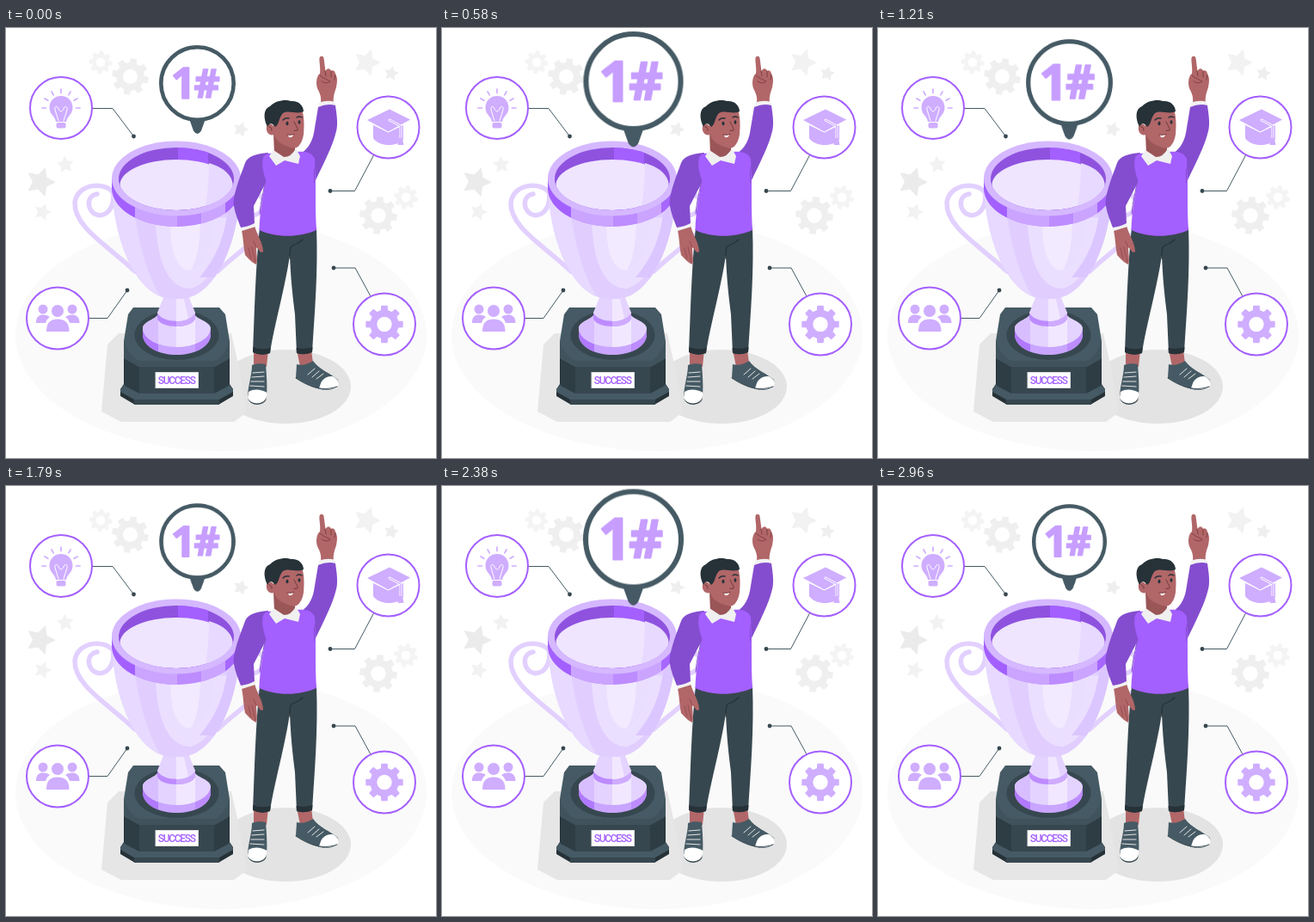
An HTML page for the animation above (3 s loop, 500 by 500 pixels).

```html
<!DOCTYPE html>
<html lang="en">
<head>
<meta charset="utf-8">
<title>Success</title>
<style>
html, body { margin: 0; width: 100%; height: 100%; overflow: hidden; background: #fff; }
svg { display: block; width: 100vw; height: 100vh; }
#bubble { transform-origin: 222.5px 72.5px; }
.link { fill: none; stroke: #455a64; stroke-width: 1; }
.ring { fill: #fff; stroke: #a45fff; stroke-width: 2; }
.line { fill: none; stroke-linecap: round; stroke-linejoin: round; }
</style>
</head>
<body>
<svg viewBox="0 0 500 500" xmlns="http://www.w3.org/2000/svg">
  <defs>
    <clipPath id="cup"><path d="M123 178C124 245 150 310 190 315H206C246 310 272 245 273 178Z"/></clipPath>
    <clipPath id="band"><path d="M123 175V186A75 45 0 0 0 273 186V175Z"/></clipPath>
    <clipPath id="hole"><ellipse cx="198" cy="175.500" rx="67" ry="36.500"/></clipPath>
    <clipPath id="dome"><path d="M159 350C160 341 174 339 177 333H219C222 339 237 341 238 350V358C236 372 218 380 198.500 380C179 380 161 372 159 358Z"/></clipPath>
    <clipPath id="domeTop"><path d="M159 349C160 341 174 339 177 333H219C222 339 237 341 238 349A39.500 22 0 0 1 159 349Z"/></clipPath>
    <path id="handle" class="line" stroke="#e2d0ff" stroke-width="5.500" d="M125 192C116 178 83 180 80 203C79 232 120 254 150 283M124 189C128 207 118 219 107 217.500C94 215 92 195 106 193"/>
  </defs>

  <!-- floor and shadows -->
  <ellipse cx="250" cy="357" rx="239" ry="135" fill="#fafafa"/>
  <ellipse cx="325" cy="417" rx="76" ry="43" fill="#e3e3e3"/>
  <path d="M111 446L118 368 131 355H262L272 400 280 447 265 458H134Z" fill="#e6e6e6"/>
  <g id="decor"></g>

  <!-- connected icons -->
  <g class="link">
    <path d="M100 93.500H124L148.500 126M96 337.500H118L141 305M428 147L405.500 189.500H377M424 312L406 279H381"/>
  </g>
  <g fill="#37474f">
    <circle cx="148.500" cy="126" r="2.400"/><circle cx="141" cy="305" r="2.400"/>
    <circle cx="377" cy="189.500" r="2.400"/><circle cx="381" cy="279" r="2.400"/>
  </g>
  <g class="ring">
    <circle cx="64" cy="93" r="36"/><circle cx="60" cy="337.500" r="36"/>
    <circle cx="444.500" cy="115.500" r="36"/><circle cx="440" cy="344.500" r="36"/>
  </g>
  <g id="icons" fill="#cfadff">
    <path d="M64 79C72 79 77.500 85 77.500 92.500C77.500 101 71 102 70 109H58C57 102 50.500 101 50.500 92.500C50.500 85 56 79 64 79Z"/>
    <rect x="58.500" y="110" width="11" height="6.500" rx="2"/>
    <path class="line" stroke="#fff" stroke-width="1" d="M61 108L57 95C56 91 60 90 61 94C63 98 65 98 67 94C68 90 72 91 71 95L67 108"/>
    <g id="rays" class="line" stroke="#cfadff" stroke-width="1.700"></g>

    <circle cx="43" cy="327" r="5.500"/><circle cx="77" cy="327" r="5.500"/>
    <path d="M35 343C35 336 38 333.500 43 333.500C47 333.500 49 334.500 51 336C48 338 47 340 46 343ZM85.500 343C85.500 336 82 333.500 77 333.500C73 333.500 71 334.500 69 336C72 338 73 340 74 343Z"/>
    <path d="M47 353C47 342 52 338.500 60 338.500C68 338.500 73.500 342 73.500 353Z"/>
    <circle cx="60" cy="329" r="7.500" stroke="#fff" stroke-width="1"/>

    <path d="M427 113L444.500 121.500 462 113V129C457 138 434 139 427 128Z"/>
    <path d="M419 107L446 94 471 106.500 444.500 121Z" stroke="#fff" stroke-width="1"/>
    <path class="line" stroke="#fff" stroke-width="3" d="M446 107L459 114V130"/>
    <path class="line" stroke="#cfadff" stroke-width="1.400" d="M446 107L459 114V130"/>
    <path d="M457 128H461L462.500 136H455.500Z"/>
  </g>

  <!-- pedestal -->
  <path d="M137 383L137 414 133 420V428L150 438H247L264 428V420L260 414V383Z" fill="#263238"/>
  <path d="M133 420L138 414 155 423H242L259 414 264 420V423L248 432H149L133 423Z" fill="#455a64"/>
  <path d="M149 432H248V438H149Z" fill="#37474f"/>
  <path d="M138 365L155 392V425L138 416ZM259 365L242 392V425L259 416Z" fill="#2e3d44"/>
  <path d="M155 390H242V425H155Z" fill="#37474f"/>
  <path d="M142 333L148 325H248L255 333 260 364V384L243 394H155L137 384V364Z" fill="#455a64"/>
  <path d="M137 364V384L155 394H243L260 384V364C255 380 246 387 240 387H158C150 387 142 378 137 364Z" fill="#40535c"/>
  <ellipse cx="198.500" cy="357" rx="49" ry="29" fill="#37474f"/>
  <rect x="174" y="400.500" width="49.500" height="18" fill="#fff" stroke="#e0e0e0"/>
  <text x="198.300" y="413.600" text-anchor="middle" font-family="Roboto, 'Liberation Sans', sans-serif" font-weight="500" font-size="12" letter-spacing="-1.300" fill="#a45fff">SUCCESS</text>

  <!-- trophy -->
  <use href="#handle"/>
  <use href="#handle" transform="matrix(-1 0 0 1 396 0)"/>
  <g clip-path="url(#dome)">
    <path d="M150 320H250V390H150Z" fill="#c9a5ff"/>
    <path d="M150 350V390H177V350Z" fill="#b079ff"/>
    <path d="M220 350V390H250V350Z" fill="#bd8cff"/>
  </g>
  <g clip-path="url(#domeTop)">
    <path d="M150 320H250V390H150Z" fill="#e4d3ff"/>
    <path d="M150 330H177V390H150Z" fill="#d8beff"/>
    <path d="M198 330H220V390H198Z" fill="#f1e8ff"/>
  </g>
  <path d="M176 330V338C180 350 216 350 220 338V330Z" fill="#bd8bff"/>
  <path d="M198 330V347C209 347 217 344 220 338V330Z" fill="#cfabff"/>
  <path d="M184 311H212L220 331C214 344 182 344 176 331Z" fill="#e4d3ff"/>
  <path d="M198 311H206L212 338C208 340 203 341 198 341Z" fill="#f1e8ff"/>
  <g clip-path="url(#cup)">
    <path d="M120 170H276V320H120Z" fill="#e1ceff"/>
    <path d="M120 180H146C150 235 160 280 181 315H120Z" fill="#e7d9ff"/>
    <path d="M174 224C176 275 190 303 215 303C242 294 255 260 260 220Z" fill="#ebdfff"/>
    <path d="M191 226C191 262 199 282 215 282C233 279 241 250 243 216Z" fill="#f2eaff"/>
    <path d="M226 220H243C241 250 233 279 215 282C222 270 226 250 226 220Z" fill="#eadeff"/>
    <path d="M258 210H275V290H225C244 268 254 244 258 210Z" fill="#dcc6ff"/>
  </g>
  <g clip-path="url(#band)">
    <path d="M120 170H276V235H120Z" fill="#bd8cff"/>
    <path d="M120 170H150V235H120Z" fill="#a360ff"/>
    <path d="M150 170H199V235H150Z" fill="#cba4ff"/>
    <path d="M227 170H255V235H227Z" fill="#cba4ff"/>
    <path d="M255 170H276V235H255Z" fill="#a767ff"/>
  </g>
  <ellipse cx="198" cy="175" rx="75" ry="43.500" fill="#d5b8ff"/>
  <g clip-path="url(#hole)">
    <path d="M130 135H268V215H130Z" fill="#8f52df"/>
    <path d="M200 135H235V215H200Z" fill="#a45fff"/>
    <ellipse cx="198" cy="182.500" rx="65.500" ry="29.500" fill="#efe5ff"/>
    <path d="M236 157C256 163 264 173 263.500 184C261 195 250 203 232 207C235 190 236 172 236 157Z" fill="#e7d9ff"/>
  </g>

  <!-- man -->
  <path d="M288 374H305L303 394H288ZM338 374H355L357 390 342 394Z" fill="#b16668"/>
  <path d="M286 392C291 390 297 390 302 391C303 403 304 418 303 428C301 439 284 440 281 430C281 417 286 404 286 392Z" fill="#455a64"/>
  <path d="M282 423C288 419 297 420 303.500 424C304 440 281 442 281 430Z" fill="#fff"/>
  <path d="M281 430C284 438 299 439 303 430C302 440 283 441 281 430Z" fill="#37474f"/>
  <path d="M338 391C344 393 351 391 357 387C364 397 378 402 386 409C389 419 376 423 365 420C354 417 345 412 337 407Z" fill="#455a64"/>
  <path d="M366 413C369 407 375 404 381 405.500C386 409 388 412 386 416C380 421 371 421 364 419Z" fill="#fff"/>
  <path class="line" stroke="#37474f" stroke-width="1" d="M337 407C349 415 366 424 385 417"/>
  <path class="line" stroke="#e6e6e6" stroke-width="1" d="M287 401L300 400M286 406L300 405M285 411L300 411M284 416L300 417M351 403L359 396M356 406L364 399M361 408L369 402"/>
  <path d="M295 232C310 238 342 240 361 232C363 282 359 330 356 377Q347 381 338 378L336 333C333 310 331 290 330 264C325 300 312 345 307 378Q297 382 287 377C289 330 290 280 295 232Z" fill="#37474f"/>
  <path d="M287.300 371Q298 375 307.700 372L307 378Q297 382 287 377ZM337.500 372Q347 374 356.500 371L356 377Q347 381 338 378Z" fill="#263238"/>
  <path class="line" stroke="#263238" stroke-width="1.200" d="M345 246C339 252 333 252 331 255C330 259 330 262 330 268"/>

  <path d="M366 88C367 80 365 76 362 70C360 64 361 56 365 53C366 46 364 40 364.500 35C365 32 369 32 369.500 35L371.500 50C374 46 377 47 378 50C381 48 383 51 383 54C386 57 385 64 384 69C382 75 380 80 381 89Z" fill="#b16668"/>
  <path class="line" stroke="#74383a" stroke-width=".8" d="M371 50L372 56M378 50V57M383 54L382 60M365 55C369 59 374 60 377 62C374 65 370 64 367 62"/>
  <path d="M363.500 87Q374 83 382.500 86L383 92 363 94Z" fill="#f2f2f2"/>
  <path d="M363 92Q374 87 383 90C385 103 386 113 384 120C380 137 370 156 360 177L338 149C350 143 356 133 358 122Z" fill="#844dcf"/>

  <path d="M274 235L289 230C292 241 299 250 299 260C296 263 294 257 291 255C291 263 293 270 291 275C286 273 282 268 278 264C276 255 276 244 274 235Z" fill="#b16668"/>
  <path class="line" stroke="#8e484b" stroke-width=".8" d="M286 255L290 272M282 256L285 268M291 255L288 248"/>
  <path d="M273 230L288 225 290 231 274 236Z" fill="#f2f2f2"/>
  <path d="M305 145C291 146 281 149 278 157C273 171 265 190 264.500 204C266 215 270 224 273 232Q282 231 289 227L288 207 304 176Z" fill="#844dcf"/>
  <path d="M299 151C300 146 307 145 313 146L325 153 338 144C348 143 356 145 359 152C361 180 359 208 361 235C341 244 313 244 294.500 235C295 212 300 190 302 177C299 167 297 159 299 151Z" fill="#a45fff"/>
  <path class="line" stroke="#844dcf" stroke-width="1" d="M302 177C300 188 296 202 295 216M359 180C358 172 358 165 360 160"/>
  <path d="M311 122L312 147Q323 160 336 148L336 132Z" fill="#9a5557"/>
  <path d="M311 142L306 149 314 160 324 154 340 158 342 149 337 140Q332 150 323 150Z" fill="#f0f0f0"/>
  <path d="M312 97L343 92C347 102 347 112 346 124C344 136 338 142 331 139C321 136 314 132 312 124C305 126 302 120 303 115C304 110 309 111 311 114Z" fill="#b16668"/>
  <path d="M304 115C299 105 299 94 307 91C314 84 325 83 331 85C340 84 346 90 346 97C338 101 329 95 322 99C317 104 318 112 313 115C309 109 306 111 304 115Z" fill="#263238"/>
  <path class="line" stroke="#263238" stroke-width="1.400" d="M322 107Q325 104 329 105M338 104Q341 102 344 104"/>
  <ellipse cx="327" cy="111" rx="1.500" ry="2.200" fill="#263238"/>
  <ellipse cx="341" cy="109.500" rx="1.400" ry="2.200" fill="#263238"/>
  <path class="line" stroke="#70383a" stroke-width="1" d="M335 109C337 114 340 117 339 119L335 119.500M306 115Q309 115 309 119"/>
  <path d="M328 124.500Q331 125 334 124Q333 128 329 127Z" fill="#fff"/>
  <path class="line" stroke="#70383a" stroke-width=".8" d="M327 124Q331 125 335 123.500"/>

  <!-- badge -->
  <g id="bubble">
    <path d="M212.500 104H232.500L227 119.500Q222.500 126.500 218 119.500Z" fill="#455a64"/>
    <circle cx="222.500" cy="64.500" r="42.200" fill="#fff" stroke="#455a64" stroke-width="4.600"/>
    <text font-family="'Open Sans', 'Noto Sans', sans-serif" font-weight="700" font-size="51" fill="#c79eff" stroke="#c79eff" stroke-width="1.500" stroke-linejoin="round"><tspan x="191.500" y="82.500">1</tspan><tspan x="218.500" y="81" font-size="47">#</tspan></text>
  </g>
</svg>
<script>
const NS = 'http://www.w3.org/2000/svg';
const $ = id => document.getElementById(id);
const polar = (x, y, r, a) => `${(x + r * Math.cos(a)).toFixed(2)} ${(y + r * Math.sin(a)).toFixed(2)}`;

function addPath(parent, d, attrs) {
  const p = document.createElementNS(NS, 'path');
  p.setAttribute('d', d);
  for (const k in attrs) p.setAttribute(k, attrs[k]);
  parent.append(p);
}

function gear(parent, x, y, r, fill, turn = 0, teeth = 8) {
  const step = 2 * Math.PI / teeth;
  const pts = [];
  for (let i = 0; i < teeth; i++) {
    const a = i * step + turn;
    pts.push(polar(x, y, r * .74, a - step * .28), polar(x, y, r * .97, a - step * .19),
      polar(x, y, r * .97, a + step * .19), polar(x, y, r * .74, a + step * .28));
  }
  const h = r * .42;
  const hole = `M${x - h} ${y}a${h} ${h} 0 1 0 ${2 * h} 0a${h} ${h} 0 1 0 ${-2 * h} 0Z`;
  addPath(parent, `M${pts.join('L')}Z${hole}`, { fill, 'fill-rule': 'evenodd', stroke: fill, 'stroke-width': r * .05, 'stroke-linejoin': 'round' });
}

function star(parent, x, y, r, fill, turn) {
  const pts = Array.from({ length: 10 }, (_, i) =>
    polar(x, y, i % 2 ? r * .5 : r, turn + (i / 5 - .5) * Math.PI));
  addPath(parent, `M${pts.join('L')}Z`, { fill, stroke: fill, 'stroke-linejoin': 'round' });
}

const decor = $('decor');
gear(decor, 144.5, 56.5, 21.5, '#efefef', .2);
gear(decor, 110, 40, 13.5, '#f4f4f4', .1);
gear(decor, 433, 218, 22, '#efefef', .1);
gear(decor, 465, 197, 14, '#f4f4f4', .2);
star(decor, 40, 179, 17, '#ebebeb', .33);
star(decor, 69, 159, 9.5, '#f2f2f2', -.1);
star(decor, 42.5, 214, 9.5, '#f2f2f2', .33);
star(decor, 273, 118, 8.5, '#efefef', .3);
star(decor, 419.5, 40, 15.5, '#f2f2f2', .33);
star(decor, 448, 53, 8, '#efefef', .2);
gear($('icons'), 440, 344.5, 22, '#cfadff');

for (let i = 0; i < 7; i++) {
  const a = Math.PI * (1 + i / 6);
  addPath($('rays'), `M${polar(64, 93, 17.5, a)}L${polar(64, 93, 22, a)}`);
}

// Six evenly spaced pulse sizes, each eased into the next
const sizes = [1, 1.305, 1.132, .995, 1.315, .975];
$('bubble').animate(
  sizes.map(s => ({ transform: `scale(${s})`, easing: 'ease-in-out' })),
  { duration: 3000, iterations: Infinity }
);
</script>
</body>
</html>
```
